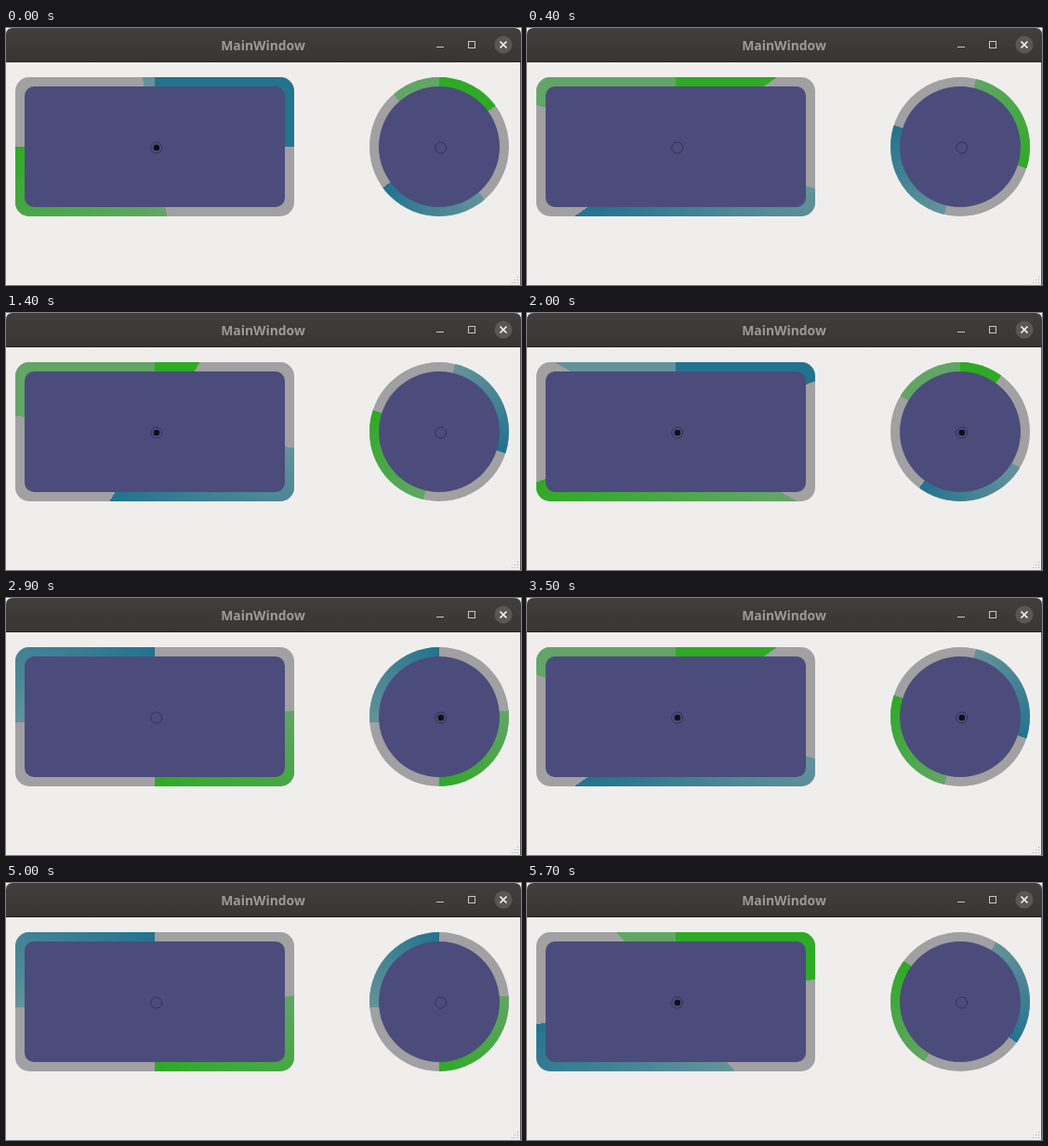
Write an HTML page that moves like this. It is 554 by 277 pixels and loops after 5.8 s.

```html
<!DOCTYPE html>
<html lang="en">
<head>
<meta charset="utf-8">
<title>MainWindow</title>
<style>
  html, body { margin: 0; width: 100%; height: 100%; overflow: hidden; background: #fff; }
  #stage { position: relative; width: 554px; height: 277px; overflow: hidden; }
  #stage > * { position: absolute; }
  #content { left: 0; top: 37px; width: 554px; height: 240px; background: #efeeec; }
  .ring { top: 53px; height: 150px; overflow: hidden; background: #a1a0a2; }
  .ring > * { position: absolute; }
  .sweep { left: 0; top: 0; width: 150px; height: 150px; transform-origin: 0 0; }
  .face { inset: 10px; background: #4b4c7b; }
  #box { left: 10px; width: 300px; border-radius: 15px; }
  #box .sweep { transform: scaleX(2); }
  #box .face { border-radius: 10px; }
  #disc { left: 391px; width: 150px; border-radius: 50%; }
  #disc .face { border-radius: 50%; }
  svg { left: 0; top: 0; }
  .title { font: 700 13.9px "Noto Sans", "Open Sans", sans-serif; fill: #9c9b98; text-anchor: middle; }
</style>
</head>
<body>
<div id="stage">
  <div id="content"></div>
  <div id="box" class="ring"><div class="sweep"></div><div class="face"></div></div>
  <div id="disc" class="ring"><div class="sweep"></div><div class="face"></div></div>
  <svg width="554" height="277" viewBox="0 0 554 277">
    <defs>
      <linearGradient id="bar" x2="0" y2="1">
        <stop offset="0" stop-color="#403f3e"/>
        <stop offset="1" stop-color="#373635"/>
      </linearGradient>
      <pattern id="dots" width="3" height="3" patternUnits="userSpaceOnUse">
        <rect x="1" y="1" width="1" height="1" fill="#a9a8a6"/>
      </pattern>
    </defs>
    <path d="M0 37V7Q0 0 7 0H547Q554 0 554 7V37Z" fill="url(#bar)"/>
    <path d="M0 36.5H554" stroke="#242323"/>
    <path d="M553.5 37V277" stroke="#555453"/>
    <text class="title" x="276.5" y="24">MainWindow</text>
    <path d="M463 20.5H471" stroke="#c9c8c5"/>
    <rect x="497.5" y="14.5" width="7" height="7" fill="none" stroke="#c9c8c5"/>
    <circle cx="535" cy="18" r="9.5" fill="#5a5856"/>
    <path d="M531.5 14.5L538.5 21.5M538.5 14.5L531.5 21.5" stroke="#fff" stroke-width="1.5"/>
    <path d="M553 264V277H540Z" fill="url(#dots)"/>
    <g fill="none" stroke="#30315a">
      <circle cx="161.7" cy="129" r="6"/>
      <circle cx="467.7" cy="129" r="6"/>
    </g>
    <g fill="#101018">
      <circle id="boxDot" cx="161.9" cy="129" r="3.3"/>
      <circle id="discDot" cx="467.9" cy="129" r="3.3"/>
    </g>
  </svg>
</div>
<script>
  const LOOP = 5800, TICK = 100;
  const STEP = 18, SPAN = 95;
  const BLUE = ["#22738f", "#65939a"];
  const GREEN = ["#2eaa24", "#62a566"];

  // Arc ending clockwise at `head`; one that crosses the top is split into flat colours.
  function arc(head, [solid, faded]) {
    head = head % 360 || 360;
    const tail = head - SPAN;
    return tail >= 0
      ? `conic-gradient(from ${tail}deg, ${faded} 0deg, ${solid} ${SPAN}deg, transparent 0)`
      : `conic-gradient(${solid} ${head}deg, transparent 0 ${tail + 360}deg, ${faded} 0)`;
  }

  function makeRing(id, start, speed, phase) {
    const sweep = document.querySelector(`#${id} .sweep`);
    const dot = document.getElementById(id + "Dot");
    return tick => {
      const pos = start + Math.floor(speed * tick + phase);
      const head = pos * STEP;
      sweep.style.background = arc(head, BLUE) + "," + arc(head + 180, GREEN);
      // The radio button toggles once per turn.
      const on = Math.floor((pos + 10) / 20) % 2 === 0;
      dot.style.visibility = on ? "visible" : "hidden";
    };
  }

  const rings = [
    makeRing("box", 5, 1.912, 0.2),
    makeRing("disc", 13, 0.956, 0.15)
  ];

  const origin = performance.now();
  let shown = -1;
  function draw() {
    const time = Math.max(0, performance.now() - origin) % LOOP;
    const tick = Math.floor(time / TICK);
    if (tick !== shown) {
      shown = tick;
      rings.forEach(paint => paint(tick));
    }
    requestAnimationFrame(draw);
  }
  draw();
</script>
</body>
</html>
```
